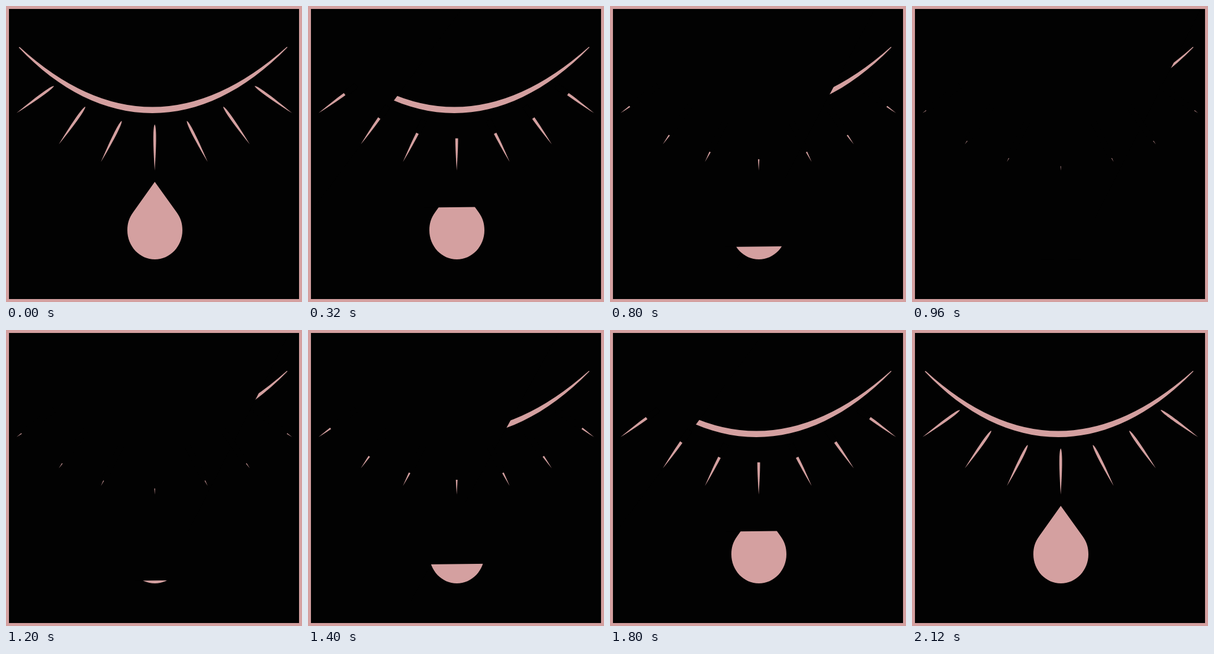
An HTML page that plays this animation: 500x500 px, repeating every 4.32 s.

```html
<!DOCTYPE html>
<html lang="en">
<head>
<meta charset="utf-8">
<title>Closed eye with tear</title>
<style>
  html, body { margin: 0; height: 100%; overflow: hidden; background: #020202; }
  svg { display: block; width: 100%; height: 100%; fill: #d4a0a0; }
  .cover { fill: #020202; }
</style>
</head>
<body>
<svg viewBox="0 0 500 500">
  <path d="M21.500 70L23 69.200Q246 272 474.500 69L475.500 69.800C326 224 155 212 21.500 70Z"/>
  <path id="lidTrack" fill="none" d="M20 68Q248.500 282 477 68"/>
  <path id="lidCover" class="cover" d="M-600-300H0V300H-600Z"/>
  <g id="lashes"></g>
  <path d="M251.300 297L288.300 348.500C295 357.500 298 367 298 379C298 406 277 428 251.500 428C226 428 205 406 205 379C205 367 208 357.500 214.700 348.500Z"/>
  <path id="dropCover" class="cover"/>
  <path d="M0 0H500V500H0ZM5 5V495H495V5Z"/>
</svg>
<script>
  const LOOP = 4320, STEP = 40, SWEEP = 2120;
  const LASH_LENGTH = 78;
  const DROP_TOP = 295.5, DROP_TRAVEL = 147;

  const [lashes, lidTrack, lidCover, dropCover] =
    ['lashes', 'lidTrack', 'lidCover', 'dropCover'].map(id => document.getElementById(id));
  const trackLength = lidTrack.getTotalLength();

  function addLash(x, y, angle) {
    lashes.innerHTML += `<g transform="translate(${x} ${y}) rotate(${angle})">
      <path d="M0 0C3 4 3.200 30 0 78C-3.200 30 -3 4 0 0Z"/>
      <rect class="cover" x="-5" y="-1" width="10" height="0"/></g>`;
  }

  function addLashPair(x, y, angle) {
    addLash(x, y, angle);
    addLash(501 - x, y, -angle);
  }

  addLash(251.2, 200, 0);
  addLashPair(81, 135, 54);
  addLashPair(134, 170, 35.1);
  addLashPair(195.5, 194, 26.8);
  const lashCovers = lashes.querySelectorAll('rect');

  function draw(elapsed) {
    const time = Math.floor((elapsed % LOOP) / STEP) * STEP;
    // The wipe runs out and back, then rests until the loop ends.
    const wipe = Math.max(0, Math.min(time, SWEEP - time)) / (SWEEP / 2);

    const { x, y } = lidTrack.getPointAtLength(wipe * trackLength);
    const shear = 0.5 + 0.5 * (1 - wipe) ** 2;
    lidCover.setAttribute('transform', `matrix(1 0 ${-shear} 1 ${x} ${y})`);

    const hidden = wipe && wipe * LASH_LENGTH + 1;
    lashCovers.forEach(cover => cover.setAttribute('height', hidden));

    const cut = DROP_TOP + wipe * DROP_TRAVEL;
    dropCover.setAttribute('d', `M195 290H308V${cut - 0.6}L195 ${cut + 0.6}Z`);
  }

  let start;
  function tick(now) {
    start ??= now;
    draw(now - start);
    requestAnimationFrame(tick);
  }
  draw(0);
  requestAnimationFrame(tick);
</script>
</body>
</html>
```
